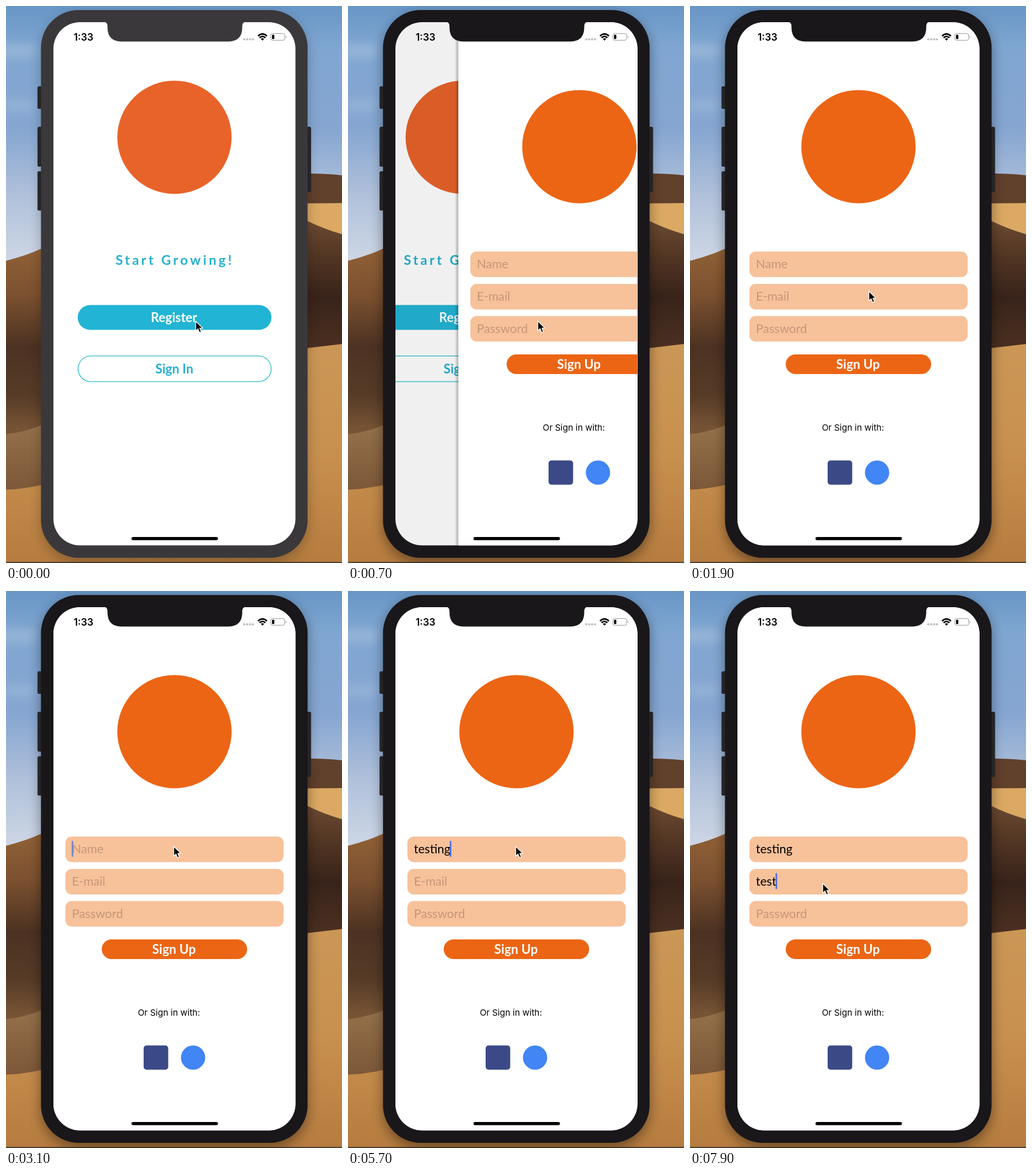
These frames come from a looping animation (581 by 964 pixels, 8 s). An HTML page:

```html
<!DOCTYPE html>
<html lang="en">
<head>
<meta charset="utf-8">
<title>Sign-up flow</title>
<style>
  html, body { margin: 0; width: 100%; height: 100%; overflow: hidden; }
  svg { display: block; width: 581px; height: 964px; }
  text { font-family: Lato, "Open Sans", sans-serif; font-size: 21px; white-space: pre; }
  .mid { text-anchor: middle; }
  .label { font-size: 22px; font-weight: 700; }
  .ui { font-family: Inter, "Liberation Sans", sans-serif; }
  .hint { fill: #c4977a; }
</style>
</head>
<body>
<svg viewBox="0 0 581 964" xmlns="http://www.w3.org/2000/svg">
  <defs>
    <linearGradient id="sky" x2="0" y2="1">
      <stop offset="0" stop-color="#6896c6"/>
      <stop offset=".16" stop-color="#7fa6d1"/>
      <stop offset=".48" stop-color="#86a6d1"/>
      <stop offset=".75" stop-color="#b2c2db"/>
      <stop offset="1" stop-color="#ced7e5"/>
    </linearGradient>
    <linearGradient id="duneLeft" gradientUnits="userSpaceOnUse" x1="0" y1="425" x2="0" y2="838">
      <stop offset="0" stop-color="#8f6036"/>
      <stop offset=".18" stop-color="#7c5130"/>
      <stop offset=".4" stop-color="#4c3222"/>
      <stop offset=".6" stop-color="#563b27"/>
      <stop offset=".74" stop-color="#765334"/>
      <stop offset="1" stop-color="#7d5839"/>
    </linearGradient>
    <linearGradient id="ridge" gradientUnits="userSpaceOnUse" x1="0" y1="728" x2="0" y2="838">
      <stop offset="0" stop-color="#94704a"/>
      <stop offset="1" stop-color="#7c5738"/>
    </linearGradient>
    <linearGradient id="duneRight" gradientUnits="userSpaceOnUse" x1="0" y1="370" x2="0" y2="592">
      <stop offset="0" stop-color="#6b4a32"/>
      <stop offset=".25" stop-color="#553825"/>
      <stop offset=".6" stop-color="#38231a"/>
      <stop offset="1" stop-color="#4b3021"/>
    </linearGradient>
    <linearGradient id="sand" gradientUnits="userSpaceOnUse" x1="0" y1="585" x2="0" y2="964">
      <stop offset="0" stop-color="#cb9756"/>
      <stop offset=".5" stop-color="#c8904f"/>
      <stop offset="1" stop-color="#b67c3f"/>
    </linearGradient>
    <linearGradient id="edge">
      <stop offset="0" stop-color="#000" stop-opacity="0"/>
      <stop offset="1" stop-color="#000" stop-opacity=".3"/>
    </linearGradient>
    <filter id="blur" x="-20%" y="-20%" width="140%" height="140%"><feGaussianBlur stdDeviation="11"/></filter>
    <filter id="soft" x="-50%" y="-100%" width="200%" height="300%"><feGaussianBlur stdDeviation="9"/></filter>
    <clipPath id="screen"><rect x="82" y="28" width="418.5" height="905.5" rx="46"/></clipPath>
  </defs>

  <!-- desert backdrop -->
  <rect width="581" height="445" fill="url(#sky)"/>
  <g fill="#b4c9df" opacity=".45" filter="url(#soft)">
    <ellipse cx="18" cy="78" rx="40" ry="12"/>
    <ellipse cx="22" cy="172" rx="34" ry="8"/>
  </g>
  <path d="M300 300Q500 284 581 293V350H300Z" fill="#61402c"/>
  <path d="M300 343Q480 342 581 341V964H300Z" fill="#dba963"/>
  <path d="M300 340Q460 345 521 372Q550 386 581 395V600H300Z" fill="url(#duneRight)"/>
  <path d="M0 441Q35 432 61 420L320 390V860H0Z" fill="url(#duneLeft)"/>
  <path d="M0 741Q30 738 61 726H300V850H0Z" fill="url(#ridge)"/>
  <path d="M0 837Q30 836 61 829L300 700V620L521 592L581 585V964H0Z" fill="url(#sand)"/>
  <rect y="962" width="581" height="2" fill="#51402f"/>

  <!-- phone body -->
  <rect id="shadow" x="61" y="15" width="460" height="948" rx="65" filter="url(#blur)"/>
  <g fill="#252427">
    <rect x="54.5" y="139" width="10" height="39" rx="2.5"/>
    <rect x="54.5" y="209" width="10" height="69" rx="2.5"/>
    <rect x="54.5" y="286" width="10" height="68" rx="2.5"/>
    <rect x="517" y="209" width="10.5" height="113" rx="2.5"/>
  </g>
  <rect class="bezel" x="60.5" y="7" width="461" height="948" rx="65"/>

  <g clip-path="url(#screen)">
    <rect x="82" y="28" width="419" height="906" fill="#fff"/>
    <g id="welcome">
      <ellipse cx="291.3" cy="227.2" rx="98.8" ry="98" fill="#e8632a"/>
      <text x="189.5" y="448" fill="#23b1cf" font-weight="700" style="font-size:23px;letter-spacing:4px">Start Growing!</text>
      <g id="register">
        <rect x="124" y="517.5" width="335" height="43" rx="21.5" fill="#22b4d4"/>
        <text class="mid label" x="290.5" y="546.5" fill="#fff">Register</text>
      </g>
      <rect x="124.6" y="605.6" width="334" height="44.6" rx="22.3" fill="#fff" stroke="#2cb9c8" stroke-width="1.3"/>
      <text class="mid label" x="291" y="635.5" fill="#23b1cf">Sign In</text>
    </g>
    <rect id="dim" x="82" y="28" width="419" height="906"/>
    <g id="form">
      <rect x="76" y="28" width="6" height="906" fill="url(#edge)"/>
      <rect x="82" y="28" width="419" height="906" fill="#fff"/>
      <ellipse cx="291.3" cy="243.4" rx="98.8" ry="98" fill="#ec6515"/>
      <g id="fields"></g>
      <rect x="165.5" y="603" width="251.5" height="34" rx="17" fill="#ec6515"/>
      <text class="mid label" x="290.5" y="627.5" fill="#fff">Sign Up</text>
      <text class="mid ui" x="281.7" y="735" style="font-size:15px">Or Sign in with:</text>
      <rect x="238" y="786.5" width="42.5" height="42" rx="5" fill="#3b4a87"/>
      <circle cx="323.5" cy="807.5" r="21" fill="#4285f4"/>
      <rect id="caret" y="432.5" width="2.6" height="27.5" rx="1" fill="#456de4"/>
    </g>
  </g>

  <!-- notch and status bar -->
  <path class="bezel" d="M169 27Q175.500 28 175.500 35V38Q176 61 199 61.500H385Q408 61 408.500 38V35Q408.500 28 415 27Z"/>
  <text class="ui mid" x="134" y="59.500" font-weight="600" style="font-size:17px">1:33</text>
  <g fill="#bdbdc1">
    <circle cx="412" cy="57.700" r="1.900"/><circle cx="417" cy="57.700" r="1.900"/>
    <circle cx="422" cy="57.700" r="1.900"/><circle cx="427" cy="57.700" r="1.900"/>
  </g>
  <g fill="none" stroke="#000" stroke-width="2.600">
    <path d="M435.800 52Q443.500 44.800 451.200 52"/>
    <path d="M438.500 55Q443.500 50.200 448.500 55"/>
  </g>
  <path d="M440.800 57Q443.500 54.700 446.200 57L443.500 60Z"/>
  <rect x="458" y="47.700" width="24" height="11.600" rx="3.200" fill="#fff" stroke="#96969a"/>
  <rect x="460" y="49.700" width="4" height="7.600" rx="1.300"/>
  <path d="M483.700 51.500Q486 53.500 483.700 55.500Z" fill="#96969a"/>
  <rect x="217" y="919" width="149.500" height="5.400" rx="2.700"/>

  <path id="pointer" d="M0 0V16.800L3.900 13.200L6.700 19.700L9.700 18.400L7 12.100H12.200Z" fill="#000" stroke="#fff" stroke-width="1.300" stroke-linejoin="round"/>
</svg>
<script>
const LOOP = 8000, STEP = 100, SCREEN = 418.5;
const $ = id => document.getElementById(id);

const fields = [['Name', 425], ['E-mail', 481], ['Password', 536.5]].map(([hint, y]) => {
  const g = document.createElementNS('http://www.w3.org/2000/svg', 'g');
  g.innerHTML = `<rect x="102.700" y="${y}" width="377.300" height="44.300" rx="11" fill="#f7c19a"/>
    <text x="114" y="${y + 29}"></text>`;
  $('fields').append(g);
  return { hint, y, text: g.lastElementChild };
});

// time, x, y
const pointerPath = [[0, 328, 545.5], [1500, 328.5, 545], [2300, 290, 442], [6000, 290, 442], [6600, 229.5, 506]];
// time, opacity
const press = [[150, 1], [300, .5], [400, .24], [450, .24], [700, 1]];
// focus time and key times for each field
const entries = [
  { focus: 2575, word: 'testing', keys: [3900, 4150, 4400, 4600, 5000, 5250, 5500] },
  { focus: 6800, word: 'test', keys: [7250, 7400, 7600, 7800] }
];

const clamp = v => Math.min(1, Math.max(0, v));
const smooth = u => u * u * (3 - 2 * u);

function sample(table, t, ease = u => u) {
  let i = table.findIndex(row => row[0] > t);
  if (i < 0) i = table.length;
  const a = table[Math.max(0, i - 1)], b = table[Math.min(i, table.length - 1)];
  const u = b[0] > a[0] ? ease(clamp((t - a[0]) / (b[0] - a[0]))) : 0;
  return a.slice(1).map((v, k) => v + (b[k + 1] - v) * u);
}

// solid just after input, then a soft blink
function blink(idle) {
  const p = idle % 1000;
  return p < 600 ? clamp((600 - p) / 100) : clamp((p - 850) / 150);
}

function typing(t) {
  let active = -1;
  fields.forEach((f, i) => {
    const e = entries[i];
    const typed = e ? e.word.slice(0, e.keys.filter(k => k <= t).length) : '';
    f.text.textContent = typed || f.hint;
    f.text.setAttribute('class', typed ? '' : 'hint');
    f.typed = typed;
    if (e && t >= e.focus) active = i;
  });
  const caret = $('caret');
  caret.setAttribute('opacity', 0);
  if (active < 0) return;
  const f = fields[active], e = entries[active];
  const last = Math.max(e.focus, ...e.keys.filter(k => k <= t));
  caret.setAttribute('x', 113.6 + (f.typed ? f.text.getComputedTextLength() - .8 : 0));
  caret.setAttribute('y', f.y + 7.5);
  caret.setAttribute('opacity', blink(t - last));
}

function draw(t) {
  const focused = t >= 100;
  document.querySelectorAll('.bezel').forEach(b => b.setAttribute('fill', focused ? '#19171a' : '#3a383b'));
  $('shadow').setAttribute('opacity', focused ? .42 : .25);

  const left = (1 - clamp((t - 557) / 500)) ** 4;
  $('welcome').setAttribute('transform', `translate(${-.3 * SCREEN * (1 - left)})`);
  $('form').setAttribute('transform', `translate(${SCREEN * left})`);
  $('form').setAttribute('visibility', left < 1 ? 'visible' : 'hidden');
  $('dim').setAttribute('opacity', .08 * (1 - left));
  $('register').setAttribute('opacity', sample(press, t)[0]);

  typing(t);
  $('pointer').setAttribute('transform', `translate(${sample(pointerPath, t, smooth)})`);
}

const start = performance.now();
function tick() {
  const t = (performance.now() - start) % LOOP;
  draw(Math.floor(t / STEP) * STEP);
  requestAnimationFrame(tick);
}
tick();
</script>
</body>
</html>
```
